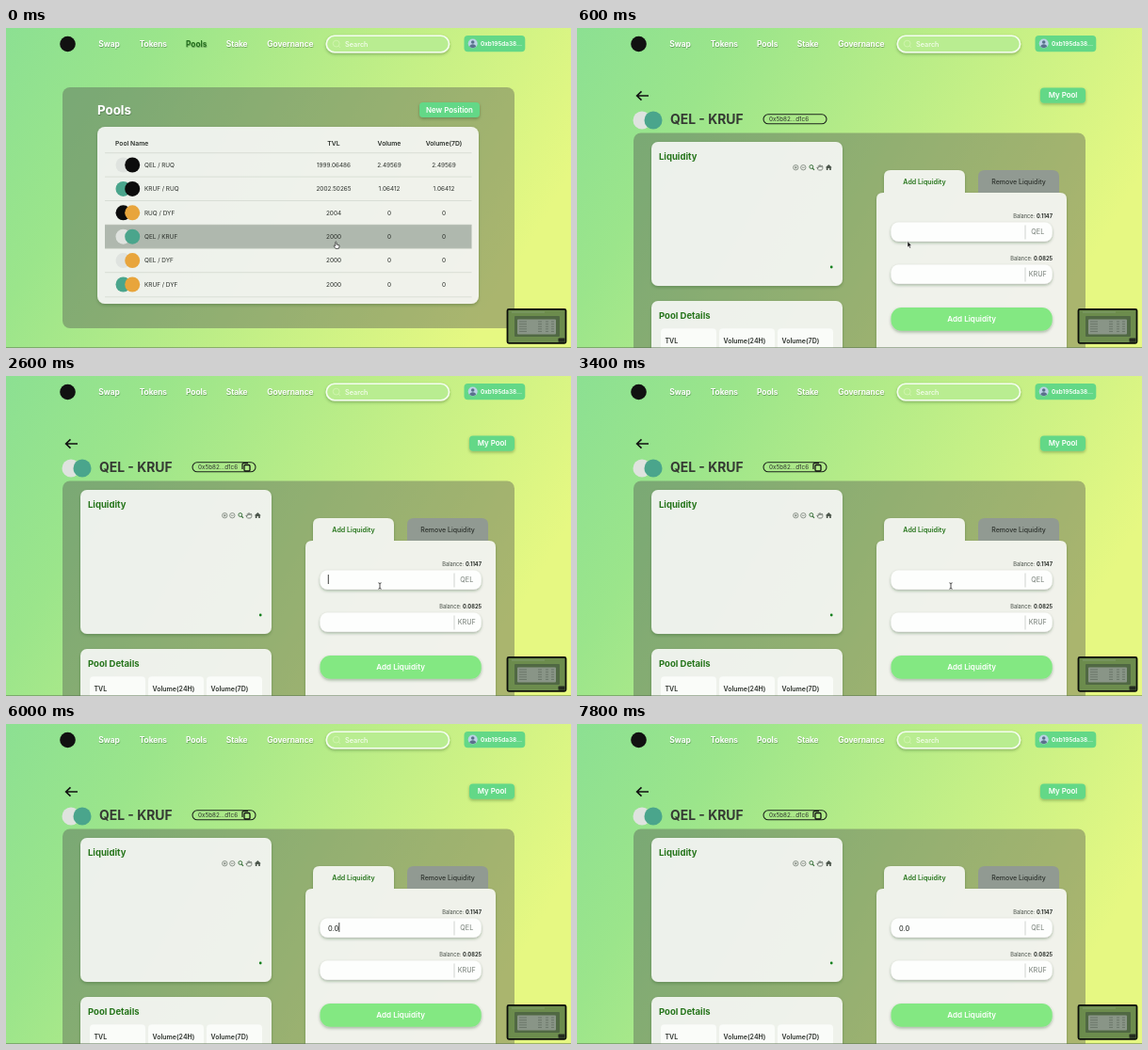
An HTML page that plays this animation: 600 px wide and 340 px high, repeating every 8000 ms.

```html
<!DOCTYPE html>
<html lang="en">
<head>
<meta charset="utf-8">
<title>Liquidity pools</title>
<style>
  html, body { margin: 0; width: 100%; height: 100%; overflow: hidden; }
  svg { display: block; width: 100vw; height: 100vh; }
  text { font-family: Inter, "Open Sans", sans-serif; white-space: pre; }
</style>
</head>
<body>
<svg id="stage" viewBox="0 0 600 340" preserveAspectRatio="none">
  <defs>
    <linearGradient id="sky" gradientUnits="userSpaceOnUse" x1="0" y1="0" x2="517" y2="298">
      <stop offset="0" stop-color="#8ce092"/>
      <stop offset=".25" stop-color="#9be58b"/>
      <stop offset="1" stop-color="#e6f882"/>
    </linearGradient>
    <linearGradient id="face" x1="0" y1="0" x2=".3" y2="1">
      <stop offset="0" stop-color="#f6dc52"/>
      <stop offset=".3" stop-color="#f2cd38"/>
      <stop offset=".5" stop-color="#f8e77c"/>
      <stop offset=".7" stop-color="#f1cf3c"/>
      <stop offset="1" stop-color="#f5df5c"/>
    </linearGradient>
    <filter id="soft" x="-20%" y="-30%" width="140%" height="170%">
      <feDropShadow dx="0" dy="1.5" stdDeviation="1.5" flood-color="#1c3c1c" flood-opacity=".35"/>
    </filter>
    <filter id="glyph" x="-20%" y="-30%" width="140%" height="180%">
      <feDropShadow dx=".4" dy="1" stdDeviation=".7" flood-color="#1c3c1c" flood-opacity=".45"/>
    </filter>
  </defs>
</svg>
<script>
const stage = document.getElementById('stage');
const DARK = '#2b302b', GREEN = '#25741a', MINT = '#63d887', CARD = 'rgba(255,255,255,.85)';
const COINS = { QEL: '#dfe3df', RUQ: '#0c0c0c', KRUF: '#4aa58c', DYF: '#e8a53c' };

function add(parent, tag, attrs, content) {
  const el = document.createElementNS('http://www.w3.org/2000/svg', tag);
  for (const key in attrs) el.setAttribute(key, attrs[key]);
  if (content !== undefined) el.textContent = content;
  return parent.appendChild(el);
}
const group = (parent, attrs = {}) => add(parent, 'g', attrs);
const box = (p, x, y, right, bottom, r, fill, more) =>
  add(p, 'rect', { x, y, width: right - x, height: bottom - y, rx: r, fill, ...more });
const disc = (p, cx, cy, r, fill, more) => add(p, 'circle', { cx, cy, r, fill, ...more });
const path = (p, d, stroke, width, more) =>
  add(p, 'path', { d, fill: 'none', stroke, 'stroke-width': width, ...more });
const label = (p, str, x, y, size, weight, fill, more) =>
  add(p, 'text', { x, y, 'font-size': size, 'font-weight': weight, fill, ...more }, str);
const MID = { 'text-anchor': 'middle' };
const SOFT = { filter: 'url(#soft)' };
const GLYPH = { filter: 'url(#glyph)' };

function button(p, str, x, y, right, bottom, r, size, fill = MINT) {
  box(p, x, y, right, bottom, r, fill, SOFT);
  label(p, str, (x + right) / 2, (y + bottom) / 2 + size * .36, size, 600, '#fff', MID);
}

function coinPair(p, a, b, x, y, r, gap) {
  disc(p, x, y, r, COINS[a]);
  disc(p, x + gap, y, r, COINS[b]);
}

box(stage, 0, 0, 600, 340, 0, 'url(#sky)');

// Pool list
const list = group(stage);
box(list, 60, 63, 540, 319, 8, 'rgba(80,80,80,.4)');
label(list, 'Pools', 97, 92, 13.3, 700, '#fff', GLYPH);
button(list, 'New Position', 439, 79, 503, 95, 4, 7.9);
box(list, 97, 105, 502, 293, 8, CARD, SOFT);
label(list, 'Pool Name', 116, 125, 6.8, 600, DARK);
[['TVL', 348], ['Volume', 407], ['Volume(7D)', 465]].forEach(([str, x]) =>
  label(list, str, x, 125, 6.8, 600, DARK, MID));
const pools = [
  ['QEL', 'RUQ', '1999.06486', '2.49569'],
  ['KRUF', 'RUQ', '2002.50265', '1.06412'],
  ['RUQ', 'DYF', '2004', '0'],
  ['QEL', 'KRUF', '2000', '0'],
  ['QEL', 'DYF', '2000', '0'],
  ['KRUF', 'DYF', '2000', '0']
];
pools.forEach(([a, b, tvl, volume], i) => {
  const y = 145.5 + i * 25.4;
  if (i === 3) box(list, 105, 209, 494.5, 234.3, 0, '#afb8ae');
  path(list, `M105 ${y - 12.8}H494.5`, '#c9d1c7', .6);
  coinPair(list, a, b, 124.5, y, 8, 9.7);
  label(list, `${a} / ${b}`, 147, y + 2.3, 6.4, 400, DARK);
  [[tvl, 348], [volume, 407], [volume, 465]].forEach(([str, x]) =>
    label(list, str, x, y + 2.3, 6.4, 400, DARK, MID));
});
path(list, 'M105 285.8H494.5', '#c9d1c7', .6);

// Loading coin
const loading = group(stage);
disc(loading, 300, 200, 77.3, 'rgba(160,232,140,.3)', { stroke: '#28771a', 'stroke-width': 4.4, ...SOFT });
add(loading, 'ellipse', { cx: 300.7, cy: 239.6, rx: 26.8, ry: 8, fill: '#72925c' });
disc(loading, 297, 193.5, 30, '#ee6c1c');
for (let i = 0; i < 17; i++) {
  const a = (130 + i * 10) * Math.PI / 180, c = Math.cos(a), s = Math.sin(a);
  path(loading, `M${297 + 30 * c} ${193.5 + 30 * s}L${302 + 30 * c} ${198.5 + 30 * s}`, '#f6b04a', 1.1);
}
disc(loading, 302, 198.5, 29.3, 'url(#face)', { stroke: '#f9e36a', 'stroke-width': 1.2 });
disc(loading, 302, 198.5, 25, 'none', { stroke: '#e9bd2f', 'stroke-width': .8 });

// Pool detail
const detail = group(stage);
path(detail, 'M76 72H64M68.5 67.3L63.6 72L68.5 76.7', '#111', 1.6);
button(detail, 'My Pool', 492, 63.5, 540, 79.7, 4, 7.9);
coinPair(detail, 'QEL', 'KRUF', 69, 98, 9.5, 12);
label(detail, 'QEL - KRUF', 99, 102.3, 13.9, 700, '#353a33');
box(detail, 198, 91.8, 265, 101.8, 5, 'none', { stroke: '#1c241c', 'stroke-width': 1.1 });
label(detail, '0x5b82...d1c6', 204, 99.2, 6.3, 400, DARK);
const copyIcon = group(detail);
box(copyIcon, 253, 94.5, 259, 101, 1.2, 'none', { stroke: '#111', 'stroke-width': 1.3 });
path(copyIcon, 'M251 99V93.8Q251 92.6 252.2 92.6H257', '#111', 1.2);

box(detail, 60, 111.5, 540, 350, 8, 'rgba(80,80,80,.4)');
box(detail, 79, 121, 282, 274, 7, CARD, SOFT);
label(detail, 'Liquidity', 87, 139.8, 9.5, 700, GREEN);
[232.3, 240.3].forEach((x, i) => {
  disc(detail, x, 148.2, 2.7, 'none', { stroke: '#667066', 'stroke-width': .7 });
  path(detail, `M${x - 1.4} 148.2h2.8` + (i ? '' : `M${x} 146.8v2.8`), '#667066', .7);
});
disc(detail, 248.8, 147.5, 1.9, 'none', { stroke: '#39713a', 'stroke-width': 1 });
path(detail, 'M250.2 149L252 150.9', '#39713a', 1.1);
path(detail, 'M256.2 150.8L254.8 148.2L256.3 148.7V146.2M257.4 148V145.4M258.6 148V145.4M259.8 148V146L260.8 147V149.5L259.8 151H256.5',
  '#666e66', .8);
add(detail, 'path', { d: 'M267.3 145L263.8 148.3H264.8V151H266.5V149H268.1V151H269.8V148.3H270.8Z', fill: '#4c564c' });
disc(detail, 270.2, 254, 1.4, '#16811f');

box(detail, 79, 290, 282, 350, 7, CARD, SOFT);
label(detail, 'Pool Details', 87, 309.2, 9.5, 700, GREEN);
[['TVL', 89], ['Volume(24H)', 151], ['Volume(7D)', 213]].forEach(([str, x], i) => {
  box(detail, x, 319.3, x + 59, 350, 4, '#fafcf9');
  label(detail, str, x + 4.5, 334.6, 7, 600, DARK);
});

path(detail, 'M318 350V182Q318 175 325 175H326V158Q326 151 333 151H405Q412 151 412 158V175H513Q520 175 520 182V350Z',
  'none', 0, { fill: CARD, ...SOFT });
path(detail, 'M426 175V158Q426 151 433 151H505Q512 151 512 158V175Z', 'none', 0, { fill: '#919a92' });
label(detail, 'Add Liquidity', 369, 165.6, 7.1, 600, GREEN, MID);
label(detail, 'Remove Liquidity', 469, 165.6, 7, 500, DARK, MID);
[['0.1147', 'QEL', 206.5], ['0.0825', 'KRUF', 251.5]].forEach(([amount, coin, y]) => {
  const balance = label(detail, 'Balance: ', 505, y - 5, 5.7, 400, '#444c44', { 'text-anchor': 'end' });
  add(balance, 'tspan', { 'font-weight': 700, fill: DARK }, amount);
  box(detail, 333.5, y, 504.7, y + 20.3, 8, '#fdfefd', SOFT);
  path(detail, `M476 ${y + 3}v15`, '#c4cac3', .8);
  label(detail, coin, 489.3, y + 12.3, 7.2, 400, '#777f78', MID);
});
button(detail, 'Add Liquidity', 333.5, 297, 504.7, 321.7, 11, 8.1, '#83e882');
const amountText = label(detail, '', 342, 219.8, 7.5, 400, '#161a16');
const caret = path(detail, 'M0 211V221', '#111', .8);

// Header
disc(stage, 65.5, 17, 8.3, '#111');
const navLinks = {};
[['Swap', 98.3], ['Tokens', 141.7], ['Pools', 191], ['Stake', 233.7], ['Governance', 277.3]].forEach(([str, x]) => {
  navLinks[str] = label(stage, str, x, 20, 8.4, 600, '#fff', GLYPH);
});
box(stage, 340.3, 8.3, 470.5, 25.7, 8.7, '#b9ed91', { stroke: '#f4fdf0', 'stroke-width': 1.6, ...SOFT });
disc(stage, 350.7, 16.6, 3.4, 'none', { stroke: '#d5f5b4', 'stroke-width': .8 });
path(stage, 'M353.2 19L355 20.8', '#d5f5b4', .8);
label(stage, 'Search', 360, 19.7, 7.3, 500, '#f6fdf0');
box(stage, 486.5, 8, 551.3, 25.3, 4, MINT);
disc(stage, 495.7, 16.5, 5, '#bcd3e6');
disc(stage, 495.7, 15, 1.8, '#59708c');
path(stage, 'M492.3 20Q492.6 17.3 495.7 17.3T499.1 20Q495.7 22.3 492.3 20Z', 'none', 0, { fill: '#59708c' });
label(stage, '0xb195da38...', 504, 19, 6.4, 600, '#fff');

// Preview window
const preview = group(stage);
box(preview, 532.5, 298.8, 594.5, 334.8, 1.5, '#6c8c4d', { stroke: '#0b0e0a', 'stroke-width': 1.8 });
box(preview, 540, 306, 588, 328, 1, '#506843');
box(preview, 543, 309.5, 584, 325.5, 1, '#899587');
for (let y = 312; y < 325; y += 2.6) path(preview, `M545 ${y}h8M565 ${y}h4M573 ${y}h3M579 ${y}h3`, '#566154', .6);
path(preview, 'M537 302H572', '#8da77c', .7);
box(preview, 586.5, 329.5, 593.5, 333.7, .8, '#252c20');
path(stage, 'M0 339.6H600', '#56714d', .8, { opacity: .7 });

// Pointers, each drawn around its own origin
const pointers = {
  hand: path(stage, 'M-1.2 -3.6Q-.5 -4.3 0 -3.4V-1L2.8 -.3Q3.4 1 2.2 3.4H-1L-3 .5Q-2.5 -.4 -1.2 .6Z', '#222', .7, { fill: '#fff' }),
  arrow: path(stage, 'M0 -3.5V3L1.4 1.8L2.4 4L3.5 3.5L2.5 1.3H4.3Z', '#fff', .5, { fill: '#111' }),
  beam: path(stage, 'M-1.6 -3.2Q0 -3.2 0 -2.2Q0 -3.2 1.6 -3.2M0 -2.4V2.4M-1.6 3.2Q0 3.2 0 2.2Q0 3.2 1.6 3.2', '#222', .8)
};

// Each track holds [start in ms, value] and keeps its value until the next step.
const DURATION = 8000, STEP = 200;
const tracks = {
  view: [[0, 'list'], [200, 'loading'], [600, 'detail']],
  pointer: [[0, ['hand', 351, 231]], [200, ['arrow', 351, 230]], [1000, ['arrow', 358, 229]],
    [1200, ['beam', 380, 225]], [1400, ['beam', 397, 223]], [4600, null]],
  amount: [[0, ''], [4600, '0'], [4800, '0.'], [5000, '0.0']],
  focus: [[0, null], [1600, 1600], [4600, 4600], [4800, 4800], [5000, 5000]],
  copy: [[0, false], [2200, true]]
};
const at = (track, t) => track.reduce((value, [start, next]) => t >= start ? next : value, null);
const show = (el, on) => el.setAttribute('display', on ? 'inline' : 'none');
const caretX = { '': 342.3, '0': 347.2, '0.': 349.2, '0.0': 353.8 };
const views = { list, loading, detail };

function render(now) {
  const t = Math.floor(now % DURATION / STEP) * STEP;
  const view = at(tracks.view, t);
  for (const key in views) show(views[key], key === view);
  navLinks.Pools.setAttribute('fill', view === 'list' ? '#1f6b1a' : '#fff');

  const [kind, x, y] = at(tracks.pointer, t) || [];
  for (const key in pointers) show(pointers[key], key === kind);
  if (kind) pointers[kind].setAttribute('transform', `translate(${x} ${y})`);

  const amount = at(tracks.amount, t), focus = at(tracks.focus, t);
  amountText.textContent = amount;
  caret.setAttribute('transform', `translate(${caretX[amount]} 0)`);
  show(caret, focus !== null && (t - focus) % 1000 < 500);
  show(copyIcon, at(tracks.copy, t));
}

const origin = performance.now();
function tick() {
  render(performance.now() - origin);
  requestAnimationFrame(tick);
}
tick();
</script>
</body>
</html>
```
